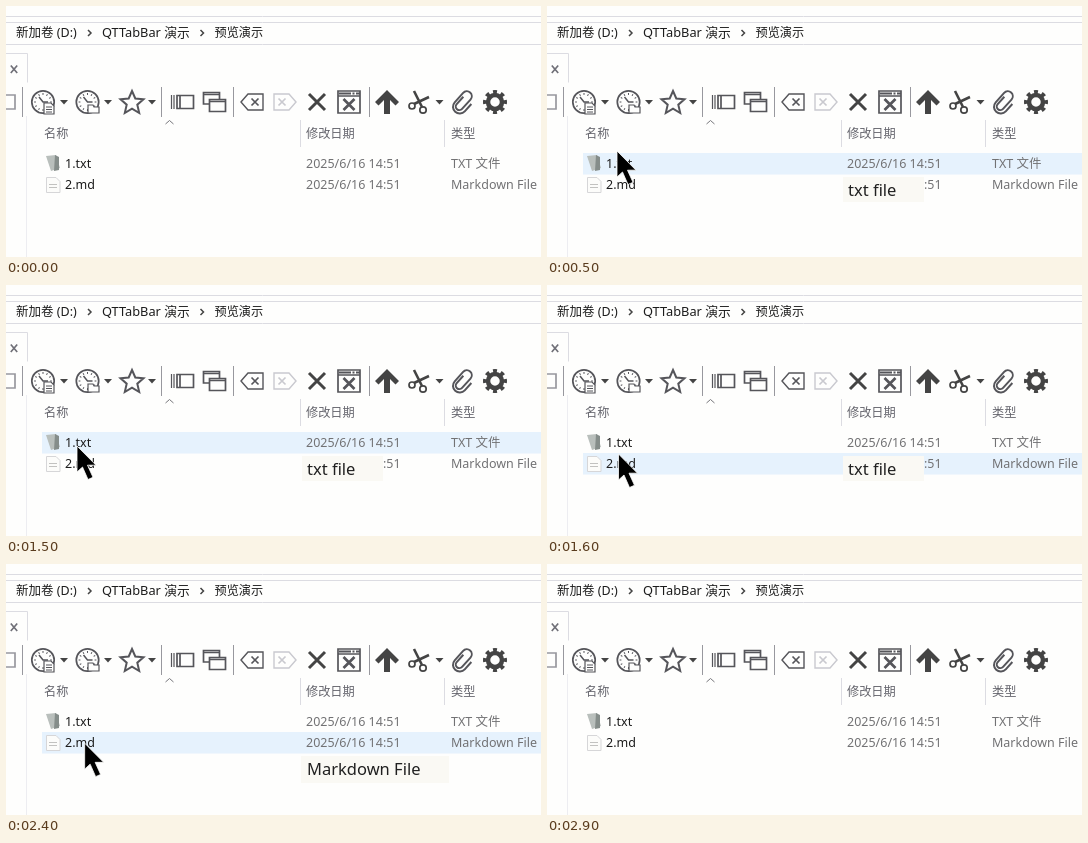
An HTML page for the animation above (3 s loop, 535 by 251 pixels).

```html
<!DOCTYPE html>
<html lang="zh-CN">
<head>
<meta charset="utf-8">
<style>
  html, body { margin: 0; height: 100%; overflow: hidden; background: #fefefd; }
  svg { display: block; }
  text { font: 12.5px "Noto Sans", "Noto Sans CJK SC", "Noto Sans CJK", sans-serif; fill: #1c1c1c; }
  .cjk { font-size: 12.2px; }
  .head text { fill: #64646c; }
  .info text { fill: #727274; }
  .tip text { font-size: 16.5px; fill: #202020; }
  .tip rect { fill: #faf9f4; }
  .rule { fill: none; stroke: #dcdce2; }
  .faint { fill: none; stroke: #ededf1; }
  .icons { fill: none; stroke: #55555a; stroke-width: 1.7; }
  .solid { fill: #444; stroke: none; }
  .paper { fill: #fefefd; }
</style>
</head>
<body>
<svg width="535" height="251" viewBox="0 0 535 251">
  <defs>
    <path id="drop" class="solid" d="M-4-2H4L0 2.5Z"/>
    <path id="chevron" d="M-1.5-3L1.5 0L-1.5 3" fill="none" stroke="#444" stroke-width="1.5"/>
    <g id="clock">
      <circle r="11.2"/>
      <circle r="8" pathLength="24" stroke-width="1.8" stroke-dasharray=".5 1.5" stroke-dashoffset=".25"/>
      <path d="M-4-5L0 0H5" stroke-width="1.5"/>
    </g>
  </defs>

  <path class="rule" d="M0 10.5H535M0 16.5H535M0 38.5H535M0 47.5H21.5V76.5M294.5 114V141M438.5 114V141"/>
  <path class="faint" d="M20.5 110V251"/>
  <text x="10" y="31">新加卷 (D:)</text>
  <use href="#chevron" x="83.5" y="27"/>
  <text x="96" y="31" style="font-size:12.8px">QTTabBar 演示</text>
  <use href="#chevron" x="196" y="27"/>
  <text x="208.5" y="31" class="cjk">预览演示</text>
  <path d="M4.800 59.500L11.200 67M11.200 59.500L4.800 67" stroke="#707078" stroke-width="1.700"/>

  <g class="icons">
    <path d="M16.5 81V111M155.5 81V111M227.5 81V111M363.5 81V111" stroke="#98989e" stroke-width="1"/>
    <path d="M0 89H9V103H0" stroke="#98989e"/>
    <!-- recent folders and files -->
    <use href="#clock" x="37" y="96"/>
    <path class="paper" d="M38 97H45L48 100V108H38Z" stroke-width="1.2"/>
    <path d="M40 101H46M40 103.500H46M40 106H46" stroke-width="1"/>
    <use href="#clock" x="81.500" y="96"/>
    <path class="paper" d="M82 99H87L88 101H93V107H82Z" stroke-width="1.2"/>
    <path stroke-width="2" d="M126 85L129.300 92.500L137.500 93.300L131.300 98.700L133.200 107L126 102.700L118.800 107L120.700 98.700L114.500 93.300L122.700 92.500Z"/>
    <!-- windows -->
    <path d="M165.500 89V103M168 89V103" stroke-width="1.200"/>
    <path d="M171 89.500H187.500V102.500H171ZM174 90V102"/>
    <path d="M197.500 86.500H213.500V98H197.500ZM197.500 88.500H213.500"/>
    <path class="paper" d="M203.500 93.500H219.500V105.500H203.500ZM203.500 95.500H219.500"/>
    <!-- closing -->
    <path d="M235 96L242 88H257V104H242Z" stroke-width="1.400"/>
    <path d="M245.500 92.500L252.500 99.500M252.500 92.500L245.500 99.500"/>
    <g stroke="#c9c9cf">
      <path d="M290 96L283 88H268V104H283Z" stroke-width="1.400"/>
      <path d="M272.500 92.500L279.500 99.500M279.500 92.500L272.500 99.500"/>
    </g>
    <path d="M303 88L319 104M319 88L303 104" stroke="#444" stroke-width="3"/>
    <path d="M332 85H354V107H332ZM332 90H354"/>
    <path d="M333 87.500H354" stroke-width="2" stroke-dasharray="12 1.500 2 1.500"/>
    <path d="M337.500 93L348.500 104M348.500 93L337.500 104" stroke-width="2.700"/>
    <path class="solid" d="M381 84L393 96L389.500 99.500L384 94V108H378V94L372.500 99.500L369 96Z"/>
    <!-- scissors -->
    <g stroke="#444">
      <path d="M408 85L416 101M423 91L408 98" stroke-width="2.600"/>
      <circle cx="406" cy="100" r="3"/>
      <circle cx="417" cy="104" r="3.200"/>
    </g>
    <path d="M-4-5V6A4 4 0 0 0 4 6V-8A5.500 5.500 0 0 0-7-8V6A7.500 7.500 0 0 0 8 6V-5"
          transform="translate(457 96.500) rotate(42) scale(.9)" stroke-width="2.200"/>
    <!-- gear -->
    <g stroke="#444">
      <circle cx="489" cy="96" r="7" stroke-width="4.500"/>
      <circle cx="489" cy="96" r="10" stroke-width="4" pathLength="16" stroke-dasharray="1" stroke-dashoffset=".5"/>
    </g>
    <use href="#drop" x="58" y="96"/>
    <use href="#drop" x="102" y="96"/>
    <use href="#drop" x="146" y="96"/>
    <use href="#drop" x="433.500" y="96"/>
  </g>

  <path d="M159.500 118L163.500 114.500L167.500 118" fill="none" stroke="#77777c"/>
  <g class="head">
    <text x="38" y="132" class="cjk">名称</text>
    <text x="300" y="132" class="cjk">修改日期</text>
    <text x="445" y="132" class="cjk">类型</text>
  </g>

  <rect id="hover" x="36" width="499" height="21.500" fill="#e6f2fd"/>

  <path d="M40 150L50 149L54 162L45 165Z" fill="#b9bfbc"/>
  <path d="M49 149L53 151L53 164L48 165Z" fill="#858d8a"/>
  <path d="M40.500 171.500H50L54 175.500V186.500H40.500Z" fill="#fcfcfa" stroke="#d6d6d8"/>
  <path d="M43 178.500H51M43 181.500H51" stroke="#c2c2c0"/>
  <text x="59" y="162">1.txt</text>
  <text x="59" y="183">2.md</text>
  <g class="info">
    <text x="300" y="162">2025/6/16 14:51</text>
    <text x="300" y="183">2025/6/16 14:51</text>
    <text x="445" y="162">TXT 文件</text>
    <text x="445" y="183">Markdown File</text>
  </g>

  <g class="tip" id="textTip">
    <rect x="296" y="171" width="81" height="25"/>
    <text x="301" y="190">txt file</text>
  </g>
  <g class="tip" id="markdownTip">
    <rect x="295" y="192" width="148" height="27"/>
    <text x="301" y="211">Markdown File</text>
  </g>
  <path id="cursor" d="M0 0V26L5.500 21L11 33.500L16 31.300L10.500 19.200H19Z" stroke="#fefefd" stroke-width=".8"/>
</svg>
<script>
  const LOOP = 3000, STEP = 100;
  // time, x, y of the pointer tip
  const path = [[100, 70, 145], [1300, 70, 145], [1600, 71.5, 169], [2000, 73.5, 174], [2700, 82.5, 183], [2900, 85, 185]];
  const byId = id => document.getElementById(id);
  const show = (id, on) => byId(id).setAttribute('visibility', on ? 'visible' : 'hidden');
  const within = (t, from, to) => t >= from && t < to;

  function pointerAt(t) {
    const i = Math.max(1, path.findIndex(p => p[0] > t));
    const [a, b] = [path[i - 1], path[i]];
    const k = (t - a[0]) / (b[0] - a[0]);
    return [1, 2].map(n => a[n] + (b[n] - a[n]) * k);
  }

  function draw(now) {
    const t = Math.floor(now % LOOP / STEP) * STEP;
    const active = within(t, 100, 2900);
    show('cursor', active);
    show('hover', active);
    show('textTip', within(t, 400, 1900));
    show('markdownTip', within(t, 1900, 2900));
    if (active) byId('cursor').setAttribute('transform', `translate(${pointerAt(t)})`);
    byId('hover').setAttribute('y', t < 1600 ? 147 : 168);
    requestAnimationFrame(draw);
  }
  draw(performance.now());
</script>
</body>
</html>
```
